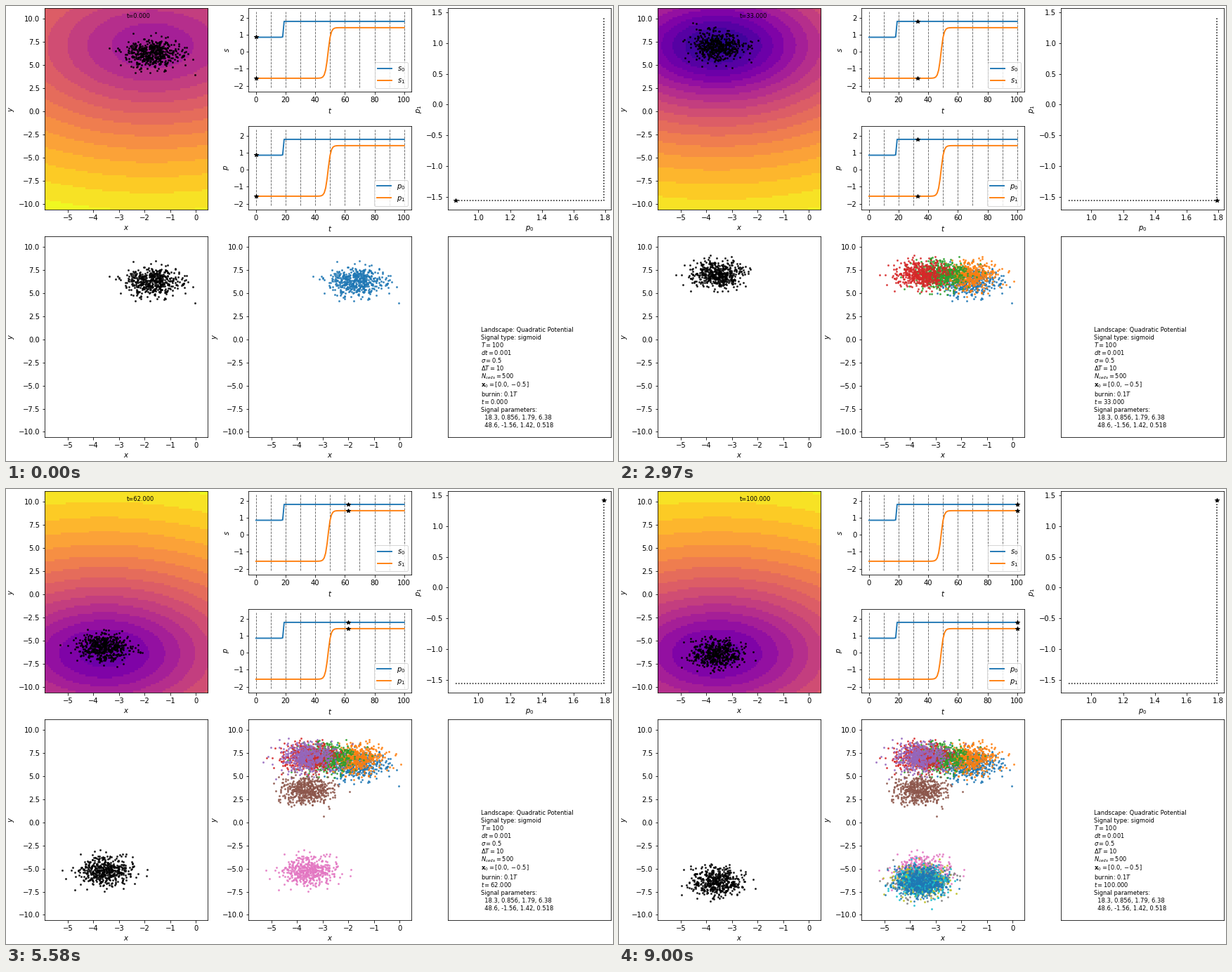
A matplotlib script for the animation above (9.09 s loop, 864 by 648 pixels).

```python
import numpy as np
import matplotlib.pyplot as plt
from matplotlib.animation import FuncAnimation

W, H = 864, 648
T, STEP, CELLS, SIGMA = 100, 10, 500, 0.5
COLS, WIDTH = (55.3, 345.3, 629.3), 232
XLIM, YLIM = (-5.89, 0.462), (-10.6, 11.12)
# switch time, start level, end level, rate
SIGNALS = [(18.3, 0.856, 1.79, 6.38), (48.6, -1.56, 1.42, 0.518)]
STIFF = np.array([1 / 2, 2 / 9])


def signal(t):
    return np.array([a + (b - a) / 2 * (1 + np.tanh(r * (t - tc)))
                     for tc, a, b, r in SIGNALS])


def simulate(dt=0.02, burnin=10):
    """Cells drifting down the tilted quadratic potential, one state per unit time."""
    rng = np.random.default_rng(7)
    steps = round(1 / dt)
    cells = np.tile([0.0, -0.5], (CELLS, 1))

    def advance(t0, frozen=False):
        for i in range(steps):
            p = signal(0 if frozen else t0 + i * dt)
            noise = rng.standard_normal(cells.shape)
            cells[:] += -(STIFF * cells + p) * dt + SIGMA * np.sqrt(dt) * noise

    for _ in range(burnin):
        advance(0, frozen=True)
    cells[0] = -0.05, 3.95
    states = [cells.copy()]
    for t in range(T):
        advance(t)
        states.append(cells.copy())
    return states


def grid(lim, n=100):
    edges = np.linspace(*lim, n + 1)
    return (edges[1:] + edges[:-1]) / 2


GX, GY = np.meshgrid(grid(XLIM), grid(YLIM))


def landscape(t, band=0.053, start=0.019):
    """Log-scaled potential, cut into flat colour bands."""
    p0, p1 = signal(t)
    phi = GX**2 / 4 + GY**2 / 9 + p0 * GX + p1 * GY
    level = np.log1p(phi + 8.88) / 3.75
    return (np.floor((level - start) / band) + 0.5) * band + start


plt.rcParams["font.family"] = "DejaVu Sans"
fig = plt.figure(figsize=(W / 72, H / 72), dpi=72, facecolor="white")


def panel(col, top, height, xlabel="", ylabel=""):
    ax = fig.add_axes([COLS[col] / W, 1 - (top + height) / H, WIDTH / W, height / H])
    ax.set_xlabel(xlabel)
    ax.set_ylabel(ylabel)
    return ax


def plane(col, top, height):
    ax = panel(col, top, height, "$x$", "$y$")
    ax.set(xlim=XLIM, ylim=YLIM, xticks=range(-5, 1),
           yticks=np.arange(-10, 10.1, 2.5))
    return ax


def dots(ax, color):
    return ax.scatter([], [], s=8.5, color=color, linewidths=0, alpha=0.85, zorder=3)


def star(ax):
    return ax.plot([], [], "k*", ms=6, zorder=4)[0]


times = np.arange(T + 1)
levels = signal(times)
states = simulate()


def signal_panel(top, name):
    ax = panel(1, top, 118.8, "$t$", f"${name}$")
    mid = 0.115
    ax.vlines(range(0, T + 1, STEP), mid - 2.23, mid + 2.23, colors="k",
              linestyles="--", lw=0.9, alpha=0.6)
    for i, row in enumerate(levels):
        ax.plot(times, row, lw=1.9, label=f"${name}_{i}$")
    ax.set(xlim=(-5, 105), ylim=(mid - 2.457, mid + 2.457),
           xticks=range(0, 101, 20), yticks=range(-2, 3))
    ax.legend(loc="lower right")
    return star(ax)


field = plane(0, 3, 287)
image = field.imshow(landscape(0), cmap="plasma", vmin=0, vmax=1, origin="lower",
                     extent=XLIM + YLIM, aspect="auto", interpolation="nearest")
live = dots(field, "k")
clock = field.text(0.5, 0.95, "", fontsize="small", transform=field.transAxes)

signal_stars = [signal_panel(3, "s"), signal_panel(171, "p")]

phase = panel(2, 3, 287, "$p_0$", "$p_1$")
phase.plot(*levels, "k:")
phase.set(xticks=np.arange(1, 1.9, 0.2), yticks=np.arange(-1.5, 1.6, 0.5),
          xlim=(0.8093, 1.8367), ylim=(-1.709, 1.569))
phase_star = star(phase)

latest = dots(plane(0, 328, 286.4), "k")
history = plane(1, 328, 286.4)
snapshots = []
for k in range(T // STEP + 1):
    snap = dots(history, f"C{k % 10}")
    snap.set_offsets(states[k * STEP])
    snapshots.append(snap)


def write_notes():
    """Stack the settings upward from the panel's foot; return the time row."""
    notes = panel(2, 328, 286.4)
    notes.set(xticks=[], yticks=[])
    vector = r"$\mathbf{x}_0=[0.0, -0.5]$"
    rows = ["Landscape: Quadratic Potential", "Signal type: sigmoid",
            "$T=100$", "$dt=0.001$", r"$\sigma=0.5$", r"$\Delta T=10$",
            "$N_{cells}=500$", vector, "burnin: $0.1T$", "$t$",
            "Signal parameters:"]
    rows += ["  " + ", ".join(f"{v:.3g}" for v in s) for s in SIGNALS]
    x, y = COLS[2] + 0.2 * WIDTH, 600
    texts = {}
    for row in reversed(rows):
        pad = 2 if row == vector else 0
        y -= pad
        texts[row] = fig.text(x / W, 1 - y / H, row, fontsize="small")
        y -= 11 + pad
    return texts["$t$"]


time_row = write_notes()


def update(t):
    image.set_data(landscape(t))
    live.set_offsets(states[t])
    clock.set_text(f"t={t:.3f}")
    for marker in signal_stars:
        marker.set_data([t, t], levels[:, t])
    phase_star.set_data(levels[:1, t], levels[1:, t])
    latest.set_offsets(states[t // STEP * STEP])
    for k, snap in enumerate(snapshots):
        snap.set_visible(k * STEP <= t)
    time_row.set_text(f"$t={t:.3f}$")


anim = FuncAnimation(fig, update, frames=T + 1, interval=90, repeat=True,
                     repeat_delay=0)
plt.show()
```
